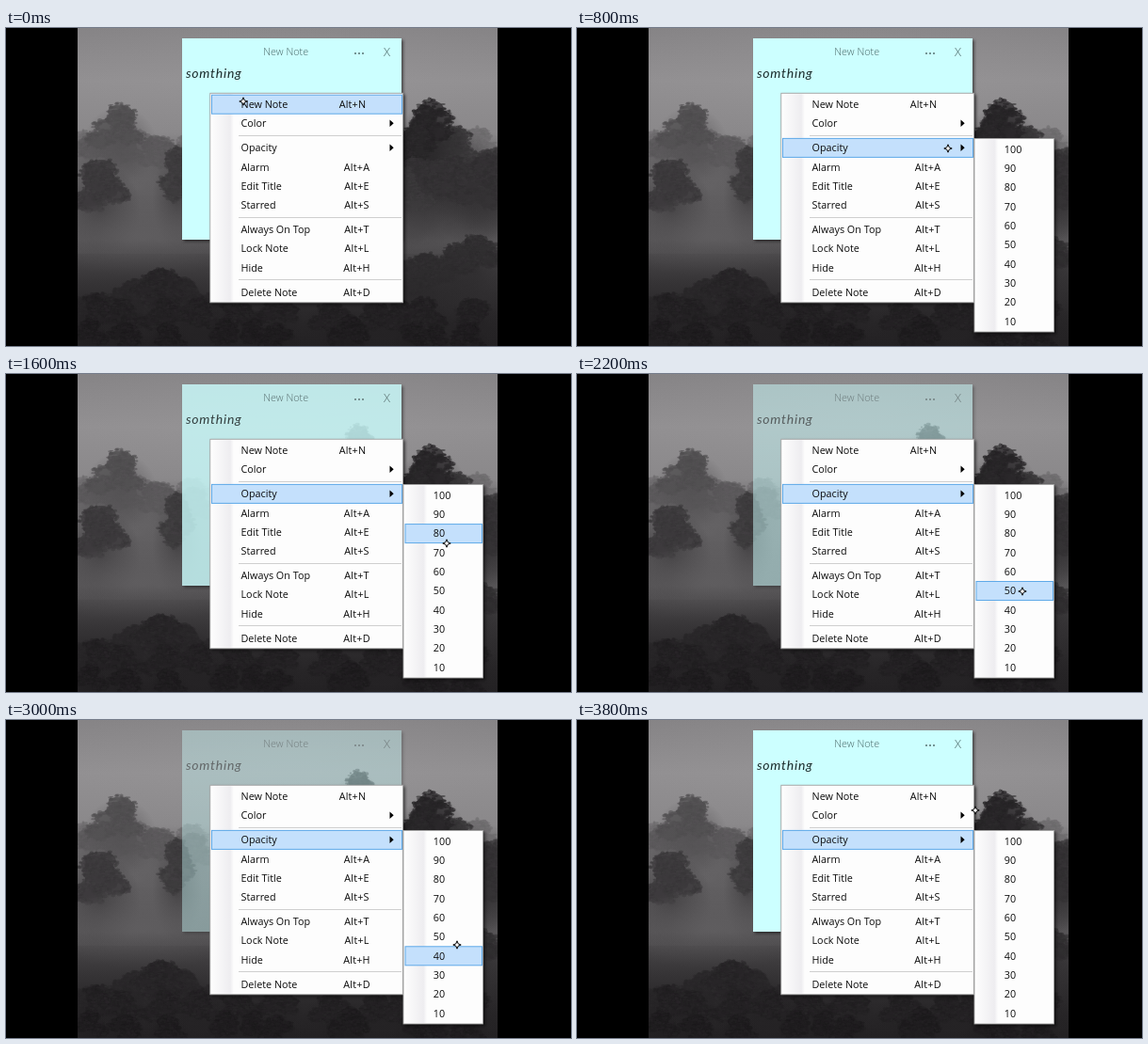
These frames come from a looping animation (600 by 338 pixels, 3900 ms). An HTML page with a canvas:

```html
<!DOCTYPE html>
<html lang="en">
<head>
<meta charset="utf-8">
<title>Note opacity menu</title>
<style>
  html, body { margin: 0; width: 100%; height: 100%; overflow: hidden; background: #000; }
  canvas { position: absolute; left: 76px; top: 0; }
  svg { position: absolute; left: 0; top: 0; }
  text { font: 10.8px "Open Sans", "Noto Sans", sans-serif; fill: #0c0c0c; }
  .keys { text-anchor: middle; letter-spacing: .2px; }
  .title { font-weight: 300; fill: #486464; }
  .hand { font: italic 14px Lato, sans-serif; letter-spacing: .75px; fill: #1c2c2c; }
  .panel { filter: drop-shadow(2px 2px 1.5px rgba(0, 0, 0, .5)); }
  .hot { fill: #c4e0fc; stroke: #5ea9e8; }
</style>
</head>
<body>
<canvas id="forest" width="446" height="338"></canvas>
<svg id="stage" width="600" height="338" viewBox="0 0 600 338">
  <defs>
    <linearGradient id="gutter">
      <stop stop-color="#fdfdfd"/><stop offset=".85" stop-color="#eeedf0"/><stop offset="1" stop-color="#fdfdfd"/>
    </linearGradient>
  </defs>
  <g id="note">
    <rect class="panel" x="187" y="11" width="233" height="214" fill="#ccffff"/>
    <text class="title" x="273.3" y="29.3">New Note</text>
    <text class="title" x="401" y="30" style="font-size:13px">X</text>
    <path d="M370 27h2m2 0h2m2 0h2" stroke="#567272" stroke-width="1.3"/>
    <text class="hand" x="191" y="53">somthing</text>
  </g>
  <g id="menu"></g>
  <g id="submenu"></g>
  <path id="cursor" d="M0-4.2L1.2-1.2 4.2 0 1.2 1.2 0 4.2-1.2 1.2-4.2 0-1.2-1.2Z"
        fill="#fff" stroke="#000"/>
</svg>
<script>
const $ = id => document.getElementById(id);

// Backdrop: misty forest
let seed = 11;
const rnd = () => (seed = (seed * 16807) % 2147483647) / 2147483647;
const spread = r => (rnd() * 2 - 1) * r;
const ctx = $("forest").getContext("2d");
ctx.translate(-76, 0);

const grey = (v, a = 1) => `rgba(${v},${v - 2},${v},${a})`;

function oval(x, y, rx, ry, fill) {
  ctx.fillStyle = fill;
  ctx.beginPath();
  ctx.ellipse(x, y, rx, ry, 0, 0, 7);
  ctx.fill();
}

function wash(y0, y1, ...stops) {
  const g = ctx.createLinearGradient(0, y0, 0, y1);
  stops.forEach(([v, a], i) => g.addColorStop(i / (stops.length - 1), grey(v, a)));
  ctx.fillStyle = g;
  ctx.fillRect(76, y0, 446, y1 - y0);
}

function haze(x, y, rx, ry, v, a) {
  ctx.save();
  ctx.translate(x, y);
  ctx.scale(rx, ry);
  const g = ctx.createRadialGradient(0, 0, 0, 0, 0, 1);
  g.addColorStop(0, grey(v, a));
  g.addColorStop(1, grey(v, 0));
  oval(0, 0, 1, 1, g);
  ctx.restore();
}

// Solid puff with a ragged leafy edge
function puff(x, y, rx, ry, shade) {
  oval(x, y, rx * .92, ry * .9, grey(shade, .75));
  for (let i = 0; i < (rx + ry) * 3; i++) {
    const a = rnd() * 7, r = .5 + rnd() * .6;
    oval(x + Math.cos(a) * r * rx, y + Math.sin(a) * r * ry,
      1 + rnd() * 2, .7 + rnd() * 1.2, grey(Math.round(shade + spread(5)), .6));
  }
}

// Domed crown whose base dissolves into the mist
function tree(x, top, w, h, shade) {
  haze(x, top + h * .6, w * .6, h * .6, shade, .8);
  for (let i = 0; i < 9; i++) {
    const p = i / 9;
    puff(x + spread(w * .36 * Math.sqrt(p)), top + h * (.08 + .5 * p), w * (.17 + rnd() * .08), h * .09 + 2, shade);
  }
}

function row(n, x0, x1, top, size, shade) {
  for (let i = 0; i < n; i++) {
    const x = x0 + (x1 - x0) * (i + rnd()) / n;
    tree(x, top(x) + spread(6), size * (.8 + rnd() * .4), size, shade);
  }
}

wash(0, 338, [134], [146], [138], [104], [84], [60], [40]);
haze(300, 40, 230, 90, 160, .25);
row(9, 80, 520, () => 112, 55, 112);
row(5, 80, 200, x => 108 + Math.abs(x - 125) * .25, 50, 92);
tree(121, 83, 66, 70, 82);
tree(290, 74, 64, 80, 82);
wash(110, 240, [90, 0], [92, .45], [88, .5]);
row(5, 405, 520, x => 92 + Math.abs(x - 450) * .5, 80, 58);
tree(374, 57, 62, 100, 56);
tree(452, 79, 66, 90, 40);
tree(436, 100, 46, 90, 42);
row(5, 420, 520, () => 140, 75, 52);
tree(100, 142, 72, 85, 60);
tree(182, 128, 44, 90, 62);
row(4, 225, 420, () => 150, 75, 58);
haze(145, 222, 120, 42, 98, .7);
haze(430, 215, 90, 40, 76, .5);
row(5, 400, 520, x => 262 - (x - 400) * .45, 60, 50);
row(7, 80, 250, x => 262 + Math.abs(x - 165) * .3, 50, 44);
wash(225, 338, [40, 0], [38, .5], [34, .8]);
tree(165, 258, 66, 60, 40);
row(11, 80, 520, () => 288, 48, 36);
row(11, 80, 520, () => 312, 40, 32);

// Menus
const rect = (x, y, w, h, attrs) => `<rect x="${x}" y="${y}" width="${w}" height="${h}" ${attrs}/>`;
const label = (x, y, s, cls = "") => `<text class="${cls}" x="${x}" y="${y + 4}">${s}</text>`;

const panel = (x, y, w, h) =>
  rect(x, y, w, h, 'class="panel" fill="#fdfdfd" stroke="#a4a4a4" stroke-width=".9"') +
  rect(x + 1, y + 1, 24, h - 2, 'fill="url(#gutter)"');

const ROW = 20.3, GAP = 5.6, TOP = 81, LEVEL_TOP = 128.8;
const groups = [
  ["New Note/N", "Color"],
  ["Opacity", "Alarm/A", "Edit Title/E", "Starred/S"],
  ["Always On Top/T", "Lock Note/L", "Hide/H"],
  ["Delete Note/D"]
];
const rowY = [];
const rows = groups.map((group, g) => group.map((item, i) => {
  const y = TOP + rowY.length * ROW + g * GAP;
  const [name, key] = item.split("/");
  rowY.push(y);
  return (g && !i ? rect(247, Math.round(y - 13.4), 173, 1, 'fill="#cfcfcf"') : "") +
    label(249.5, y, name) +
    (key ? label(key === "N" ? 368 : 372.5, y, "Alt+" + key, "keys")
         : `<path d="M407.5 ${y - 3.7}l4.2 3.7-4.2 3.7z"/>`);
}).join("")).join("");

$("menu").innerHTML = panel(216.8, 69.3, 204.8, 222.5) +
  rect(218.5, 0, 202, 20, 'id="hotItem" class="hot"') + rows;
$("submenu").innerHTML = panel(422, 117.5, 84.5, 205.5) +
  rect(424, 0, 81.5, 20, 'id="hotLevel" class="hot"') +
  Array.from({ length: 10 }, (_, i) => label(453.8, LEVEL_TOP + i * ROW, 100 - i * 10)).join("");

// Timeline
const LOOP = 3900, STEP = 100, OPEN = 600;
const path = [
  [0, 252, 78], [200, 259, 95], [500, 280, 129], [900, 432, 128], [1000, 452, 140], [1100, 459, 141],
  [1600, 468, 180], [2200, 473, 231], [2600, 477, 268], [3000, 479, 239], [3500, 455, 130], [3800, 423, 96]
];

function pointer(t) {
  const i = Math.max(1, path.findIndex(k => k[0] >= t));
  const [a, b] = [path[i - 1], path[i]];
  const p = Math.max(0, (t - a[0]) / (b[0] - a[0]));
  return [1, 2].map(j => Math.round(a[j] + (b[j] - a[j]) * p));
}

const nearestRow = y => rowY.reduce((best, r) => Math.abs(r - y) < Math.abs(best - y) ? r : best);

function draw(now) {
  const t = Math.floor(now % LOOP / STEP) * STEP;
  // Highlights trail the pointer by one step
  const [x, y] = pointer(t - STEP);
  const open = t >= OPEN;
  const level = open && x > 424 ? Math.round((y - LEVEL_TOP) / ROW) : -1;
  $("cursor").setAttribute("transform", `translate(${pointer(t)})`);
  $("hotItem").setAttribute("y", (open ? rowY[2] : nearestRow(y)) - 9.8);
  $("submenu").style.display = open ? "" : "none";
  $("hotLevel").style.display = level < 0 ? "none" : "";
  $("hotLevel").setAttribute("y", LEVEL_TOP + level * ROW - 9.8);
  $("note").style.opacity = 1 - Math.max(level, 0) / 10;
  requestAnimationFrame(draw);
}
draw(performance.now());
</script>
</body>
</html>
```
